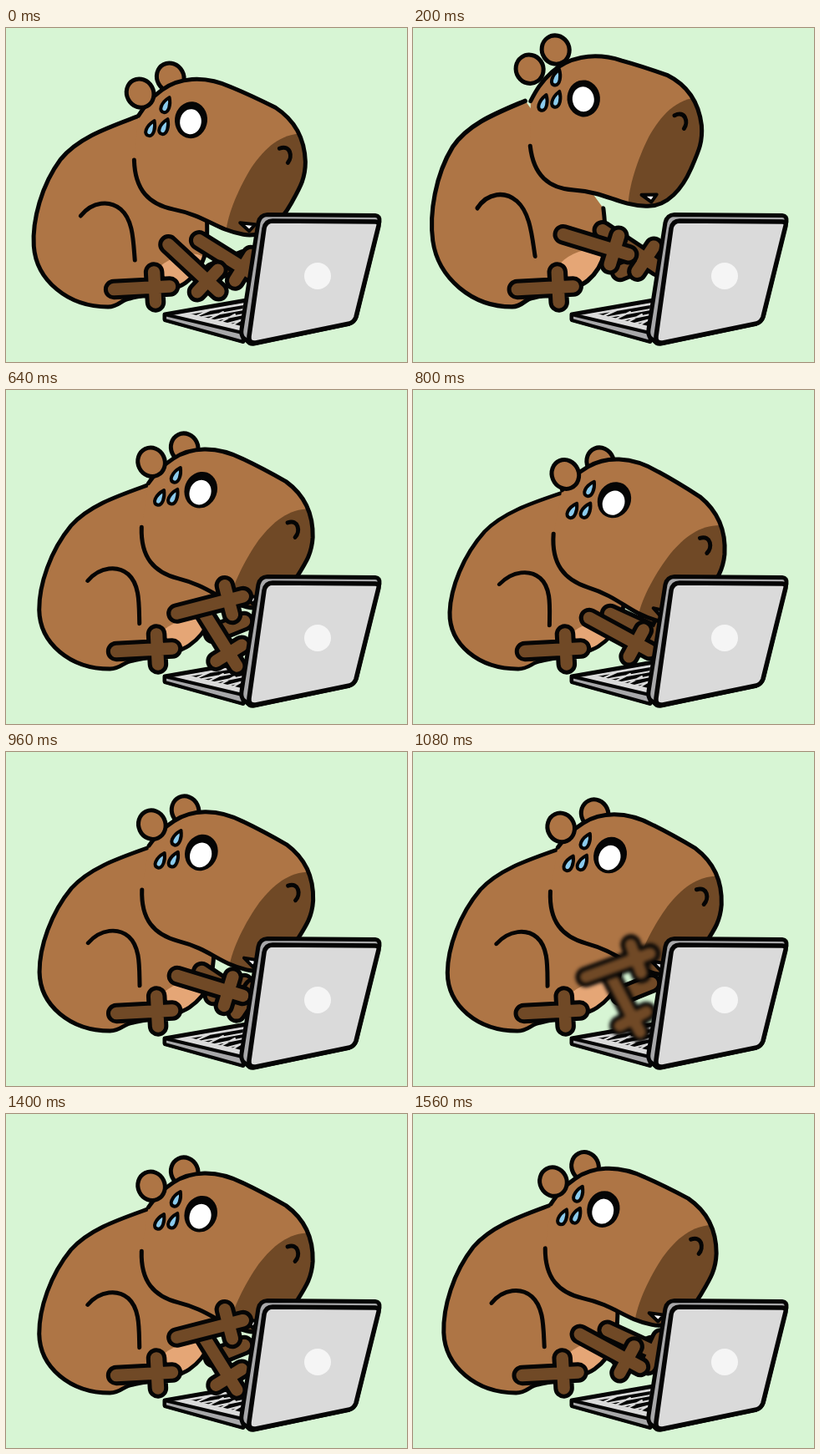
An HTML page with a canvas that plays this animation: 480 by 400 pixels, repeating every 1600 ms.

```html
<!DOCTYPE html>
<html lang="en">
<head>
<meta charset="utf-8">
<title>Busy capybara</title>
<style>
html, body { margin: 0; width: 100%; height: 100%; overflow: hidden; background: #d7f5d4; }
canvas { display: block; width: 480px; height: 400px; }
</style>
</head>
<body>
<canvas id="stage" width="480" height="400"></canvas>
<script>
const ctx = document.getElementById('stage').getContext('2d');
const LOOP = 1600, STEP = 40, BEAT = 380;
const HELD = [40, 400, 840, 1160];
const SKY = '#d7f5d4', FUR = '#ae7545', DARK = '#704926', PEACH = '#e5a676';
const INK = '#050505', METAL = '#a8a8aa', SHELL = '#dadada';

// The animal is described sitting upright; crouching is a transform.
const BODY = new Path2D('M156 106 C122 119 86 131 65 157 C42 188 31 230 33 261' +
  ' C36 302 74 334 122 334 C135 334 138 325 148 324 C170 318 200 316 215 305 C238 288 242 268 240 225');
const THIGH = new Path2D('M89 225 C103 207 124 206 137 217 C152 230 152 255 154 278');
const HEAD = new Path2D('M153 158 C154 194 171 211 200 217 C240 225 250 241 284 247' +
  ' C310 252 330 230 341 210 C352 190 358 180 358 160 C357 132 345 110 322 95' +
  ' C304 86 287 78 270 71 C235 55 205 60 186 74 C172 84 165 94 158 105');
const MUZZLE = new Path2D('M370 127 C333 121 312 140 294 166 C279 190 265 222 263 245 L300 270 L370 240Z');
const NOSTRIL = new Path2D('M327 144 C340 139 343 154 337 161');
const TOOTH = new Path2D('M280 233 L291 243 L298 235Z');
const DROP = new Path2D('M5 -9 C7 0 4 9 -1 9 C-9 8 -5 -3 5 -9Z');

function ease(from, to, t) {
  const k = Math.min(1, Math.max(0, (t - from) / (to - from)));
  return k * k * (3 - 2 * k);
}

const mix = (a, b, k) => a + (b - a) * k;

function motion(t) {
  const wave = time => 2 * Math.PI * (t - time) / BEAT;
  const w = t > LOOP / 2 ? t - LOOP : t;
  const lift = 1.5 * ease(-200, 150, w) * (1 - ease(190, 340, w));
  const pause = ease(-40, 0, w) * (1 - ease(80, 200, w));
  const u = .8 - .2 * Math.cos(wave(620)) - lift;
  const swing = Math.cos(wave(300));
  return {
    u,
    v: u > 0 ? u * (.3 + .7 * u) : 1.4 * u,
    front: mix(14 - 36 * swing, 43, pause),
    back: mix(36 + 28 * swing, 32, pause),
    blurred: !pause && swing * Math.sin(wave(300)) > .2
  };
}

function paint(path, fill, width, color = INK) {
  if (fill) { ctx.fillStyle = fill; ctx.fill(path); }
  if (width) { ctx.strokeStyle = color; ctx.lineWidth = width; ctx.stroke(path); }
}

function within(matrix, drawPart) {
  ctx.save();
  ctx.transform(...matrix);
  drawPart();
  ctx.restore();
}

function clipped(mask, path, fill) {
  ctx.save();
  ctx.clip(mask);
  paint(path, fill);
  ctx.restore();
}

function ellipse(x, y, rx, ry, angle = 0) {
  const path = new Path2D();
  path.ellipse(x, y, rx, ry, angle, 0, Math.PI * 2);
  return path;
}

// A limb lies along its own x axis; its paw is a rounded cross.
function limb(x, y, length, degrees, toe = 18) {
  ctx.save();
  ctx.translate(x, y);
  ctx.rotate(degrees * Math.PI / 180);
  const path = new Path2D(`M0 0 H${length + toe}`);
  if (toe) path.addPath(new Path2D(`M${length} ${-toe} V${toe}`));
  paint(path, null, 24.5);
  paint(path, null, 14.5, DARK);
  ctx.restore();
}

function ear(x, y) {
  paint(ellipse(x, y, 16, 17.5, -.5), FUR, 5);
}

function drop(x, y) {
  within([1, 0, 0, 1, x, y], () => paint(DROP, '#8bcbed', 4));
}

function drawBody() {
  paint(BODY, FUR);
  clipped(BODY, ellipse(207, 291, 34, 17, -.4), PEACH);
  paint(BODY, null, 5);
  paint(THIGH, null, 5);
}

function drawHead(flop, u) {
  paint(HEAD, FUR);
  clipped(HEAD, MUZZLE, DARK);
  paint(HEAD, null, 5);
  paint(TOOTH, '#fff', 4);
  paint(NOSTRIL, null, 5);
  ear(160, 78 + flop);
  drop(190, 92 + flop);
  drop(172, 120 + flop);
  drop(188, 118 + flop);
  paint(ellipse(221, 110, 19.5, 22, .1 + .3 * u), INK);
  paint(ellipse(220.5, 112 + 1.5 * u, 12.8, 15, .1 + .3 * u), '#fff');
}

function drawKeyboard() {
  paint(new Path2D('M190 343 L288 326 L284 375 L190 349Z'), SHELL, 5);
  paint(new Path2D('M190 343 L283 365 L284 376 L190 350Z'), METAL, 4);
  paint(new Path2D('M220 342 L284 331 L282 357Z'), INK);
  const gaps = new Path2D();
  for (let i = 0; i < 4; i++) {
    gaps.moveTo(228 + i * 14, 345 + i * 3.8);
    gaps.lineTo(246 + i * 14, 337 + i * 3);
    gaps.moveTo(220 + i * 15, 342 + i * 4);
    gaps.lineTo(284, 331 + i * 6);
  }
  paint(gaps, null, 2, SHELL);
}

function drawLid() {
  paint(new Path2D('M313 223.5 L442 224.5 Q448 225 447 232 L419 346 Q417 352 411 354' +
    ' L297 378 Q292 379 289 375 L284 371 Q281 367 282 361 L302 233 Q304 224 313 223.5Z'), METAL, 5);
  paint(new Path2D('M319 231 L442 232 Q447 232 446 237 L419 346 Q417 352 411 354' +
    ' L299 377 Q290 378 291 369 L309 240 Q311 231 319 231Z'), SHELL, 5.5);
  paint(ellipse(373, 297, 16, 16), '#f5f5f5');
}

function draw(t) {
  const { u, v, front, back, blurred } = motion(t);
  const armFilter = blurred ? 'blur(2.2px)' : 'none';
  const flop = 8 * v * Math.abs(v);
  const ground = 335, lean = .095 * u, squash = .07 * v;
  const bodyPose = [1, 0, -lean, 1 - squash, 4 * u + lean * ground, squash * ground];
  const headPose = [1, .11 * v, -.1 * u, 1, 31 * u, -2.5 * v];

  ctx.fillStyle = SKY;
  ctx.fillRect(0, 0, 480, 400);
  ctx.lineCap = ctx.lineJoin = 'round';

  drawKeyboard();
  within(headPose, () => ear(196 + 4 * u, 59 + flop));
  within(bodyPose, drawBody);
  limb(248, 292, 40, -22, 0);

  ctx.filter = armFilter;
  limb(231 + 5 * u, 254 + 14 * u, 62, back);
  ctx.filter = 'none';

  within(headPose, () => drawHead(flop, u));
  limb(129 + 5 * u, 313, 49, -3);

  ctx.filter = armFilter;
  limb(194 + 17 * u, 259 + 14 * u, 64, front);
  ctx.filter = 'none';
  drawLid();
}

function frame(now) {
  let t = Math.floor((now % LOOP) / STEP) * STEP;
  if (HELD.includes(t)) t -= STEP;
  draw(t);
  requestAnimationFrame(frame);
}
requestAnimationFrame(frame);
</script>
</body>
</html>
```
